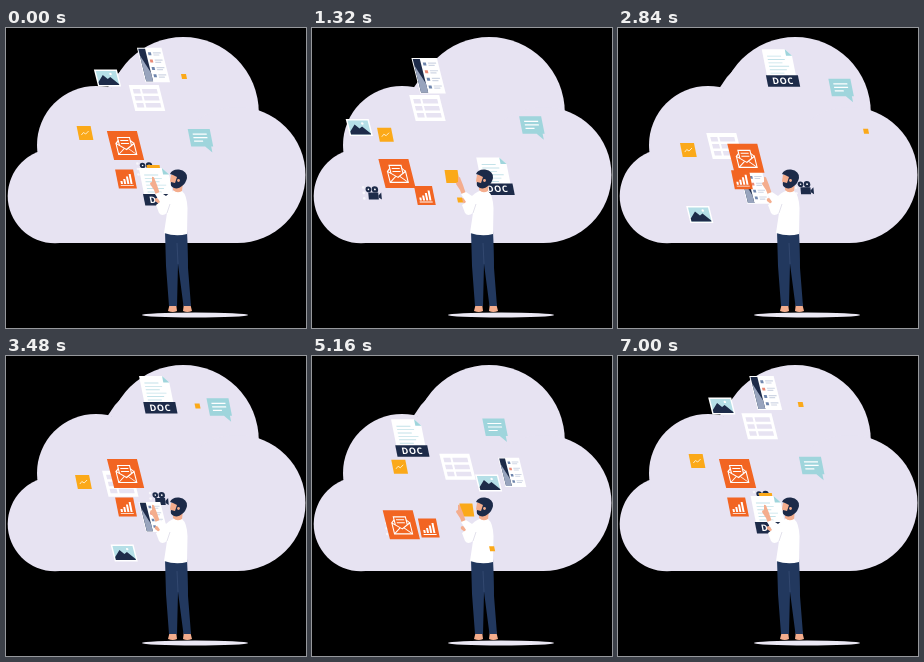
Write an HTML page with a canvas that moves like this. It is 300 by 300 pixels and loops after 7.04 s.

```html
<!DOCTYPE html>
<html lang="en">
<head>
<meta charset="utf-8">
<title>Cloud files</title>
<style>
html, body { margin: 0; width: 100%; height: 100%; overflow: hidden; background: #000; }
canvas { display: block; width: 300px; height: 300px; }
</style>
</head>
<body>
<canvas id="stage" width="300" height="300"></canvas>
<script>
const ctx = document.getElementById('stage').getContext('2d');
const LOOP = 7040, STEP = 40, TAU = Math.PI * 2;
const NAVY = '#1d2b49', DENIM = '#22385e', ORANGE = '#f26522', YELLOW = '#fba919', TEAL = '#9fd5dc',
      CLOUD = '#e7e3f2', SKIN = '#f4ad8d', WHITE = '#fff', PALE = '#cfd6e4', STEEL = '#98a4bd';

// ---- drawing helpers ----
function rect(x, y, w, h, color) {
  ctx.fillStyle = color;
  ctx.fillRect(x, y, w, h);
}
function disc(x, y, r, color) {
  ctx.fillStyle = color;
  ctx.beginPath();
  ctx.arc(x, y, r, 0, TAU);
  ctx.fill();
}
function poly(points, color) {
  ctx.fillStyle = color;
  ctx.beginPath();
  for (let i = 0; i < points.length; i += 2) ctx.lineTo(points[i], points[i + 1]);
  ctx.closePath();
  ctx.fill();
}
function line(points, color, width) {
  ctx.strokeStyle = color;
  ctx.lineWidth = width;
  ctx.beginPath();
  for (let i = 0; i < points.length; i += 2) ctx.lineTo(points[i], points[i + 1]);
  ctx.stroke();
}
function shape(path, color) {
  ctx.fillStyle = color;
  ctx.fill(new Path2D(path));
}
function place([x, y], draw, skew = 0.25, scale = 1) {
  ctx.save();
  ctx.transform(scale, 0, skew * scale, scale, x, y);
  draw();
  ctx.restore();
}

// ---- motion ----
const smooth = p => p * p * (3 - 2 * p);
const orbit = (p, cx, ax, bx, cy, ay, by) => {
  const c = Math.cos(TAU * p), s = Math.sin(TAU * p);
  return [cx + ax * c + bx * s, cy + ay * c + by * s];
};

// Half turn: lingers at the ends, hurries through the middle.
const KNOTS = [[0, 0], [0.375, 0.19], [0.466, 0.41], [0.636, 0.675], [0.784, 0.925], [1, 1]];
const SLOPES = KNOTS.map((k, i) => {
  if (!i || i === KNOTS.length - 1) return 0.1;
  const [a, b] = [KNOTS[i - 1], KNOTS[i + 1]];
  const l = (k[1] - a[1]) / (k[0] - a[0]), r = (b[1] - k[1]) / (b[0] - k[0]);
  return 2 * l * r / (l + r);
});
function swing(p) {
  let i = 0;
  while (i < KNOTS.length - 2 && p > KNOTS[i + 1][0]) i++;
  const [x0, y0] = KNOTS[i], [x1, y1] = KNOTS[i + 1];
  const h = x1 - x0, u = (p - x0) / h, s = smooth(u);
  return y0 * (1 - s) + y1 * s + h * u * (1 - u) * ((1 - u) * SLOPES[i] - u * SLOPES[i + 1]);
}
function halves(p) {
  const q = p * 2;
  return (Math.floor(q) + swing(q % 1)) / 2;
}

// ---- icons, drawn around their centre ----
function picture() {
  rect(-11.5, -8.5, 23, 17, WHITE);
  rect(-10, -7, 20, 14, '#b5dfe7');
  poly([-10, 7, -10, 4, -4, -3, 0, 1, 3, -1, 10, 6, 10, 7], NAVY);
  disc(4, -4, 1.2, WHITE);
}
function sidebar() {
  rect(-12, -17.5, 25, 35, WHITE);
  rect(-11, -16.5, 7, 33, NAVY);
  poly([-11, -10, -4, 8, -4, 16.5, -11, 16.5], STEEL);
  for (let i = 0; i < 4; i++) {
    const y = -13 + i * 7.5;
    rect(-2, y, 3, 3, i === 1 ? '#e98a76' : '#6f86ad');
    rect(3, y, 8, 1.2, PALE);
    rect(3, y + 2.2, 6, 1.2, PALE);
  }
}
function table() {
  rect(-15, -13, 30, 26, WHITE);
  for (let i = 0; i < 3; i++) {
    const y = -9 + i * 7;
    rect(-12, y, 7, 4.5, CLOUD);
    rect(-3, y, 15, 4.5, CLOUD);
  }
}
function trend() {
  rect(-7, -7, 14, 14, YELLOW);
  line([-4, 2, -1.5, -0.5, 0.5, 1, 4, -2], '#fff0cf', 0.9);
}
function envelope() {
  rect(-15, -14.5, 30, 29, ORANGE);
  line([-9, -2, -9, 9, 9, 9, 9, -2, 0, 4, -9, -2, -6, -5], WHITE, 1.1);
  line([9, -2, 6, -5], WHITE, 1.1);
  line([-9, 9, -2, 3], WHITE, 0.9);
  line([9, 9, 2, 3], WHITE, 0.9);
  line([-6, 0, -6, -8, 6, -8, 6, 0], WHITE, 1.1);
  line([-4, -5, 4, -5], WHITE, 1);
  line([-4, -2, 4, -2], WHITE, 1);
}
function chart() {
  rect(-9, -9.5, 18, 19, ORANGE);
  [3, 5, 7.5, 10].forEach((h, i) => rect(-6 + i * 3.2, 5 - h, 2, h, WHITE));
  rect(-6.5, 6, 13, 0.8, WHITE);
}
function doc() {
  poly([-14, -18.5, 9, -18.5, 15, -12, 15, 12, -14, 12], WHITE);
  poly([9, -18.5, 9, -12, 15, -12], TEAL);
  for (let i = 0; i < 6; i++) rect(-10, -12 + i * 3.4, i === 0 ? 14 : 20 - (i % 3) * 3, 0.9, '#c3e2e9');
  rect(-15, 7.5, 32, 11.5, NAVY);
  ctx.fillStyle = WHITE;
  ctx.font = 'bold 9px "Open Sans", Inter, sans-serif';
  ctx.textAlign = 'center';
  ctx.textBaseline = 'middle';
  ctx.letterSpacing = '0.6px';
  ctx.fillText('DOC', 1, 13.7);
}
function speech() {
  poly([-11, -11.5, 11, -11.5, 11, 6, 9, 6, 9, 12, 3, 6, -11, 6], TEAL);
  rect(-7, -7, 14, 1.2, WHITE);
  rect(-7, -3.5, 14, 1.2, WHITE);
  rect(-7, 0, 9, 1.2, WHITE);
}
function camera() {
  disc(-4, -4, 2.8, NAVY);
  disc(2.5, -4, 3.2, NAVY);
  disc(-4, -4, 0.8, WHITE);
  disc(2.5, -4, 0.9, WHITE);
  rect(-4.5, -1, 10, 7, NAVY);
  poly([5.5, 2, 8.5, -1, 8.5, 6, 5.5, 4], NAVY);
  for (let i = 0; i < 3; i++) disc(-9, -6 + i * 5.5, 1.3, '#f8f7fc');
}

// ---- scene ----
function cloud() {
  disc(49, 168, 47.3, CLOUD);
  disc(90, 117, 59, CLOUD);
  disc(177.3, 84.5, 75.5, CLOUD);
  poly([101.5, 60, 109, 49, 125, 32, 125, 62], CLOUD);
  disc(231.5, 147, 68, CLOUD);
  rect(46, 117, 186, 98, CLOUD);
}
function man() {
  ctx.fillStyle = '#ebe8f4';
  ctx.beginPath();
  ctx.ellipse(189, 287, 53, 2.5, 0, 0, TAU);
  ctx.fill();
  // feet and legs
  shape('M164 275 L170 275 L171 283 Q167 285 162 283 Z', SKIN);
  shape('M178 275 L184 275 L186 283 Q181 285 177 283 Z', SKIN);
  shape('M159 203 L181 203 Q182 224 182 240 L185 278 L177.5 278 L172 236 L171 278 L163 278 L160 238 Z', DENIM);
  line([172, 236, 171, 215], '#3a5078', 0.7);
  // hands
  shape('M148 162 L144 156 Q144 154 146 154 L146 149 Q148 148 149 152 L151 157 L154 166 L150 167 Z', SKIN);
  shape('M153 176 L149 173 Q148 170 151 170 L155 173 Z', SKIN);
  // shirt
  shape('M149 166 L154 164 L160 168 Q168 160 176 163 Q181 167 181.5 180 L181 206 Q170 209 158 205 L161 185 Q156 189 153 185 L150 177 L154 174 Z', WHITE);
  line([161, 185, 164, 176], '#dcdbe8', 0.8);
  // head
  shape('M167 154 L177 154 L176 163 Q171 166 167 162 Z', SKIN);
  shape('M165 147 L172 146 L172 157 L166 157 L164 153 Z', SKIN);
  shape('M164 146 Q166 141 173 141.5 Q181.5 143 181 150 Q180 155 176 158 Q172 162 167 159.5 Q164 158 165 154 L169 155 L171 149 L167 147 Z', '#1c2a48');
  disc(172.5, 152.5, 1.4, SKIN);
}

function draw(t) {
  const p = t / LOOP;
  const half = smooth((p * 2) % 1);
  const lap = t < 3600 ? t / 3600 : (t - 3600) / 3440;
  const turn = halves(p);
  const depth = 0.92 + 0.08 * Math.sin(TAU * p) + 0.06 * Math.cos(TAU * p);

  ctx.clearRect(0, 0, 300, 300);
  cloud();
  place(orbit(p, 204, -9, 21.5, 83, 29.5, 6), speech, 0.2);
  place(orbit(p, 128, 13, -19, 99, -29, -8.6), table);
  place(orbit(p, 111, -9.5, -65, 123.5, -73.5, 4.5), picture);
  place(orbit(lap, 121, 20, -63, 158.5, -17, -6), camera, 0.1);
  place(orbit(p, 147, 1, -8, 152.5, -9, -0.5), () => rect(-6.5, -6.5, 13, 13, YELLOW), 0.15);
  place(orbit(turn, 147, 0, -55, 99, -62, 0), sidebar, 0.25, depth);
  place(orbit(smooth(p), 78.5, 0.5, -10, 115.5, -10.5, 0), trend, 0.2);
  place(orbit(half, 107, 12.5, -18.5, 146, -28.5, -13.3), envelope);
  place(orbit(half, 119.5, 0.5, -7, 161.5, -10.5, 2), chart, 0.2);
  place(orbit(turn, 150.5, 0, 56, 98.5, 60, 0), doc, 0.2);
  man();
  place(orbit(lap, 188.5, -10.5, -64, 122, -73.5, 1), () => rect(-2.5, -2.5, 5, 5, YELLOW), 0.2);
}

const start = performance.now();
function tick(now) {
  const t = Math.max(0, now - start) % LOOP;
  draw(Math.floor(t / STEP) * STEP);
  requestAnimationFrame(tick);
}
draw(0);
requestAnimationFrame(tick);
</script>
</body>
</html>
```
